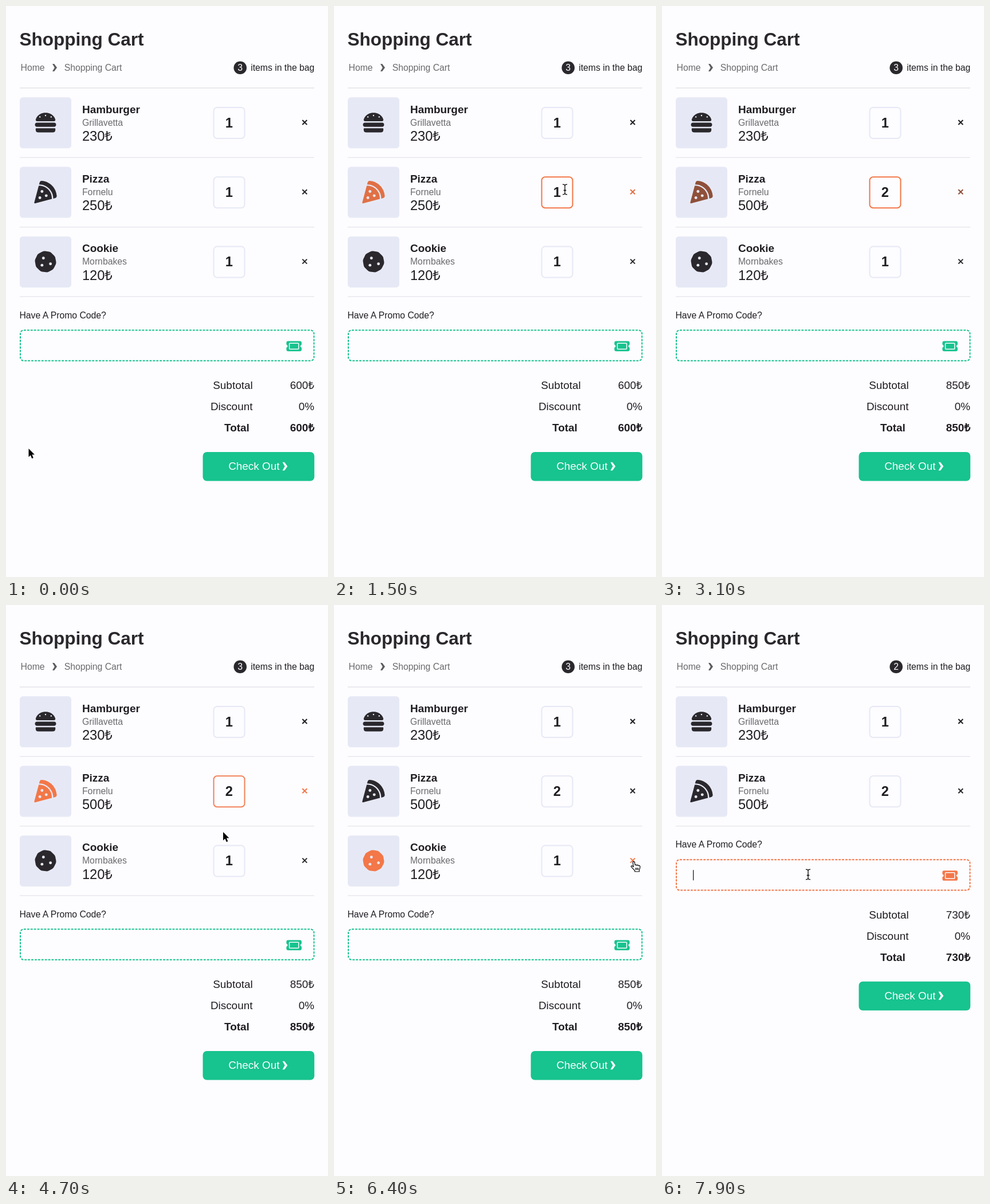
Animation, 562 px wide and 996 px high, one loop 8 s. Source, as an HTML page:

```html
<!DOCTYPE html>
<html lang="en">
<head>
<meta charset="utf-8">
<title>Shopping Cart</title>
<style>
  html, body { margin: 0; width: 100%; height: 100%; overflow: hidden; background: #fdfcff; }
  svg { display: block; width: 562px; height: 996px; }
  text { font-family: "Liberation Sans", Arial, sans-serif; white-space: pre; }
  .b { font-weight: 700; }
  .end { text-anchor: end; }
  .mid { text-anchor: middle; }
</style>
</head>
<body>
<svg id="stage" viewBox="0 0 562 996" xmlns="http://www.w3.org/2000/svg"></svg>
<script>
const LOOP = 8000, STEP = 100, PITCH = 121.3;
const BG = '#fdfcff', TILE = '#e6e9f5', INK = '#1f1d21', GREY = '#6a696c';
const dark = [42, 40, 44], orange = [243, 119, 72], green = [23, 195, 142], pale = [230, 233, 245];
const EDIT = 2800, REMOVE = 6500, CARET = 7900;

const text = (x, y, size, str, cls = '', fill = INK, id = '') =>
  `<text x="${x}" y="${y}" font-size="${size}" class="${cls}" fill="${fill}" ${id && `id="${id}"`}>${str}</text>`;
const rule = y => `<path d="M24 ${y}H538" stroke="#e4e4ea" stroke-width="1.3"/>`;
const dots = (r, ...pts) => pts.map(([x, y]) => `<circle cx="${x}" cy="${y}" r="${r}" fill="${TILE}"/>`).join('');
const chevron = (x, y, fill, k) =>
  `<path transform="translate(${x} ${y}) scale(${k})" fill="${fill}" d="M0 -6.5H3.2L8 0L3.2 6.5H0L3.8 0Z"/>`;

// Icons live on a 512 unit grid.
const icons = [
  `<path d="M61 224C45 224 32 211 32 195q0-3 .6-6C38 168 79 32 256 32s218 136 223.400 157q.6 3 .6 6c0 16-13 29-29 29z"/>
   <rect x="16" y="256" width="480" height="96" rx="48"/>
   <path d="M32 400q0-16 16-16H464q16 0 16 16v16q0 64-64 64H96q-64 0-64-64z"/>` +
   dots(16, [128, 128], [256, 96], [384, 128]),
  `<path d="M170 1c-23-2-42 14-48 35L110 80C288 80 432 223 432 402l44-12c21-6 37-25 35-48C498 160 352 14 170 1z"/>
   <path d="M400 410C406 246 273 107 102 112L.5 492c-3 11 8 22 19.500 19.500z"/>` +
   dots(32, [176, 240], [272, 336], [128, 384]),
  `<path d="M247 17c-22-3-44 1-64 11l-74 40c-20 10-36 27-46 47L27 191c-10 20-13 43-9 65l14 82c4 22 15 42 31 58l60 58
   c16 16 37 26 59 29l83 12c22 3 45-1 64-11l74-40c20-10 36-27 46-47l37-75c9-20 13-43 9-65l-15-83c-4-22-15-42-31-58
   L389 57c-16-15-37-25-59-28z"/>` +
   dots(32, [208, 176], [176, 336], [368, 304])
];

const row = ([name, shop, price], i) => `<g id="row${i}" transform="translate(0 ${i * PITCH})">
  <rect x="24" y="159.300" width="90" height="89" rx="5.500" fill="${TILE}"/>
  <g id="icon${i}" transform="translate(49.300 183.700) scale(.0769)" fill="rgb(${dark})">${icons[i]}</g>
  ${text(133, 186.8, 18.9, name, 'b')}
  ${text(133, 208.8, 15.75, shop, '', GREY)}
  ${text(133, 235.2, 23.6, price + '₺', '', INK, 'price' + i)}
  <rect id="box${i}" x="362.500" y="177" width="54" height="54" rx="6" fill="none" stroke="rgb(${pale})" stroke-width="2"/>
  ${text(389.4, 211.8, 23.6, 1, 'b mid', INK, 'qty' + i)}
  <path id="del${i}" d="M517.300 199l8 8m0 -8l-8 8" stroke="#1f1d21" stroke-width="2"/>
  ${rule(264.3)}
</g>`;

const cursors = `
  <g id="arrow"><path d="M0 0V14.800L3.300 11.600L5.700 17.300L8.300 16.200L5.900 10.600H10.400Z"
    fill="#000" stroke="#fff" stroke-width="2" paint-order="stroke" stroke-linejoin="round"/></g>
  <g id="beam" fill="none"><path id="ibar" d="M-4 -8.800Q0 -8.800 0 -6.500Q0 -8.800 4 -8.800M0 -7V7M-4 8.800Q0 8.800 0 6.500Q0 8.800 4 8.800M-2.300 1.500H2.300"
    stroke="#fff" stroke-width="2.800"/><use href="#ibar" style="stroke:#000"/>
    <path d="M-4 -8.800Q0 -8.800 0 -6.500Q0 -8.800 4 -8.800M0 -7V7M-4 8.800Q0 8.800 0 6.500Q0 8.800 4 8.800M-2.300 1.500H2.300" stroke="#000" stroke-width="1.300"/></g>
  <g id="hand" transform="translate(-6 -2)" stroke="#000" stroke-width="1.200" stroke-linejoin="round">
    <path fill="#fff" d="M4.600 3.400C4.200 1.200 7 .6 7.600 2.800L8.600 8C9 6.600 11.300 6.600 11.600 8.400C12.200 7 14.200 7.200 14.500 9
    C15.300 8 17.200 8.400 17.200 10.400C17.200 13.500 16.500 14.500 15.800 16V19H8V17.200C6 15.500 4 13 2.200 11.200C.6 9.400 2.400 8 4 9.400L5.600 10.800Z"/>
    <path d="M9.600 12.500V16M11.700 12.500V16M13.800 12.500V16"/></g>`.replace('<use href="#ibar" style="stroke:#000"/>', '');

const items = [['Hamburger', 'Grillavetta', 230], ['Pizza', 'Fornelu', 250], ['Cookie', 'Mornbakes', 120]];

document.getElementById('stage').innerHTML = `
  <rect width="562" height="996" fill="${BG}"/>
  ${text(23.6, 69.2, 31.5, 'Shopping Cart', 'b', '#2a282c')}
  ${text(25.6, 113, 15.75, 'Home', '', GREY)}
  ${chevron(81, 107.5, '#5c5b5e', 1)}
  ${text(101.8, 113, 15.75, 'Shopping Cart', '', GREY)}
  <circle cx="408.700" cy="107.700" r="11.300" fill="#2a282c"/>
  ${text(408.7, 113.2, 15.75, 3, 'mid', '#fff', 'count')}
  ${text(538.4, 113, 15.75, 'items in the bag', 'end')}
  ${rule(143)}
  ${items.map(row).join('')}
  <g id="foot">
    ${text(23.4, 544.8, 15.75, 'Have A Promo Code?')}
    <rect id="promo" x="25" y="565.500" width="512.500" height="53.300" rx="6" fill="none" stroke-width="2"
      pathLength="570" stroke-dasharray="2 1"/>
    <g id="ticket" transform="translate(489.400 581.500) scale(.0461)">
      <path d="M64 64Q0 64 0 128v64c0 9 7 16 16 19a48 48 0 0 1 0 90c-9 3-16 10-16 19v64q0 64 64 64H512q64 0 64-64v-64
        c0-9-7-16-16-19a48 48 0 0 1 0-90c9-3 16-10 16-19v-64q0-64-64-64z"/>
      <rect x="112" y="144" width="352" height="224" rx="20" fill="none" stroke="${BG}" stroke-width="32"/>
    </g>
    <path id="caret" d="M54.700 583.500V601.500" stroke="#1f1d21" stroke-width="1.300"/>
    ${text(430.6, 668.3, 18.9, 'Subtotal', 'end')}
    ${text(538, 668.3, 18.9, '', 'end', INK, 'sub')}
    ${text(430.4, 705.2, 18.9, 'Discount', 'end')}
    ${text(538, 705.2, 18.9, '0%', 'end')}
    ${text(381, 742.2, 18.9, 'Total', 'b')}
    ${text(538, 742.2, 18.9, '', 'b end', INK, 'total')}
    <rect x="343.500" y="778" width="194.700" height="50.500" rx="7" fill="rgb(${green})"/>
    ${text(388.2, 809.2, 18.9, 'Check Out', '', '#fff')}
    ${chevron(482.5, 803, '#fff', 1.1)}
  </g>
  <g id="cursor">${cursors}</g>`;

// time, x, y, pointer shape until the next entry
const path = [
  [0, 39.5, 772, 'arrow'], [300, 39.5, 772, 'arrow'], [400, 150, 612, 'arrow'], [500, 335, 351, 'arrow'],
  [600, 335, 351, 'arrow'], [700, 392, 262, 'arrow'], [800, 402, 200, 'beam'], [900, 404, 214, 'beam'],
  [1000, 404, 250, 'arrow'], [1100, 404, 300, 'beam'], [1300, 403, 320, 'beam'], [EDIT, 403, 320, ''],
  [3800, 403, 322, 'beam'], [4200, 395, 354, 'arrow'], [4500, 379, 396, 'arrow'], [4900, 379, 396, 'arrow'],
  [5300, 452, 432, 'arrow'], [5700, 523, 448, 'hand'], [REMOVE, 523, 448, 'beam'], [6700, 505, 447, 'beam'],
  [6800, 468, 430, 'arrow'], [6900, 441, 414.5, 'arrow'], [7100, 441, 414.5, 'arrow'], [7300, 372, 444, 'beam'],
  [7700, 255, 470, 'beam'], [LOOP, 255, 470, 'beam']
];

const $ = id => document.getElementById(id);
const ramp = (t, a, b) => Math.min(1, Math.max(0, (t - a) / (b - a)));
const mix = (a, b, k) => `rgb(${a.map((v, i) => Math.round(v + (b[i] - v) * k))})`;
const show = (id, on) => $(id).setAttribute('visibility', on ? 'visible' : 'hidden');

function tint(i, k) {
  const c = mix(dark, orange, k);
  $('icon' + i).setAttribute('fill', c);
  $('del' + i).setAttribute('stroke', c);
}

function draw(t) {
  const edited = t >= EDIT, removed = t >= REMOVE;
  const total = (!edited ? 600 : removed ? 730 : 850) + '₺';
  $('qty1').textContent = edited ? 2 : 1;
  $('price1').textContent = (edited ? 500 : 250) + '₺';
  $('sub').textContent = $('total').textContent = total;
  $('count').textContent = removed ? 2 : 3;
  $('row2').setAttribute('display', removed ? 'none' : 'inline');
  $('foot').setAttribute('transform', `translate(0 ${removed ? -PITCH : 0})`);

  tint(1, edited ? ramp(t, 2850, 3350) * (1 - ramp(t, 4700, 5050)) : ramp(t, 1100, 1540));
  tint(2, ramp(t, 5200, 5650));
  $('box1').setAttribute('stroke', mix(pale, orange, ramp(t, 1100, 1400) * (1 - ramp(t, 4660, 5060))));
  const promo = mix(green, orange, ramp(t, REMOVE, REMOVE + 350));
  $('promo').setAttribute('stroke', promo);
  $('ticket').setAttribute('fill', promo);
  show('caret', t >= CARET);

  const n = path.findIndex(p => p[0] > t), [t0, x0, y0, shape] = path[n - 1], [t1, x1, y1] = path[n];
  const k = ramp(t, t0, t1);
  $('cursor').setAttribute('transform', `translate(${x0 + (x1 - x0) * k} ${y0 + (y1 - y0) * k})`);
  for (const id of ['arrow', 'beam', 'hand']) show(id, id === shape);
}

const start = performance.now();
function tick() {
  const t = (performance.now() - start) % LOOP;
  draw(Math.floor(t / STEP) * STEP);
  requestAnimationFrame(tick);
}
tick();
</script>
</body>
</html>
```
